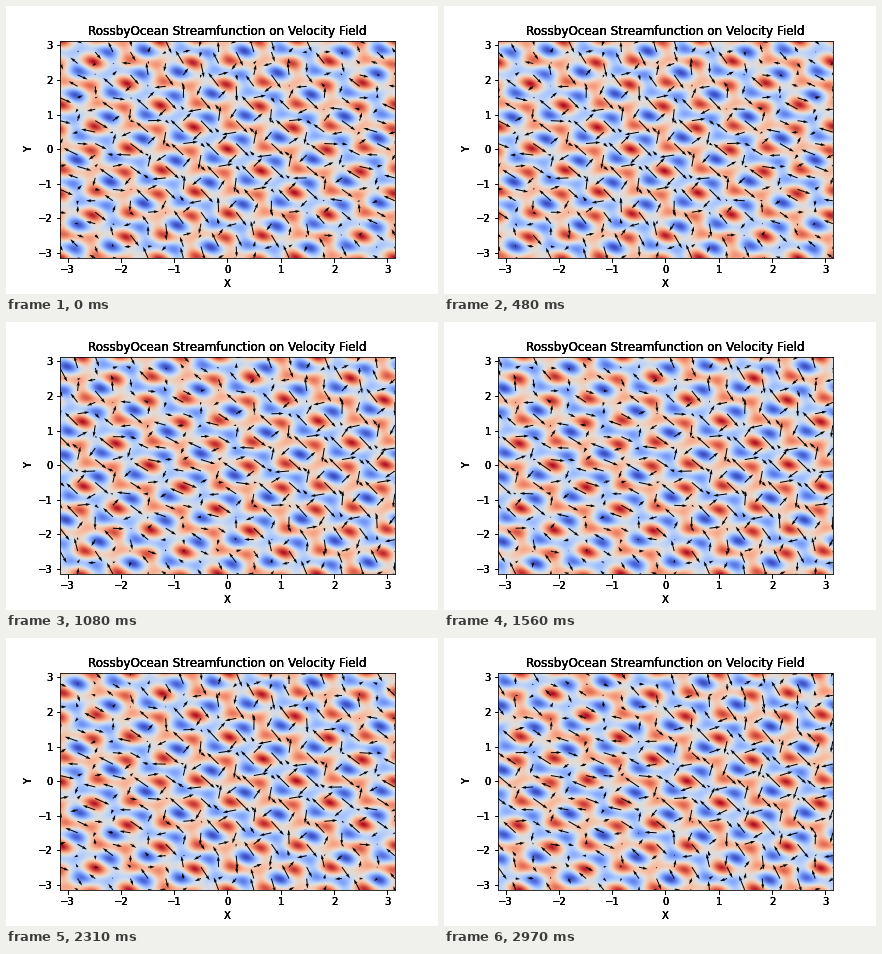
Animation, 432 px wide and 288 px high, one loop 3 s. Source, as a matplotlib script:

```python
import numpy as np
import matplotlib.pyplot as plt
from matplotlib.animation import FuncAnimation

plt.rcParams.update({"font.family": "DejaVu Sans", "font.size": 10})

FRAMES, INTERVAL = 100, 30
BETA, DT = 4.0, 100 / 99
MODES = [(10, 0), (0, 10), (7, 7)]
BOX = [0.125, 0.125, 0.775, 0.755]
L = np.pi


def phases(x, y, t):
    """Phase of each Rossby wave, with omega = -beta k / (k^2 + l^2)."""
    for k, l in MODES:
        omega = -BETA * k / (k * k + l * l)
        yield k, l, k * x + l * y - omega * t


def streamfunction(x, y, t):
    return sum(np.cos(p) for _, _, p in phases(x, y, t))


def velocity(x, y, t):
    waves = list(phases(x, y, t))
    u = sum(l * np.sin(p) for _, l, p in waves)
    v = sum(-k * np.sin(p) for k, _, p in waves)
    return u, v


def add_labels(ax):
    ax.set(xlim=(-L, L), ylim=(-L, L), xlabel="X", ylabel="Y",
           xticks=range(-3, 4), yticks=range(-3, 4))
    ax.set_title("RossbyOcean Streamfunction on Velocity Field", fontsize=12)


fig = plt.figure(figsize=(6, 4), dpi=72, facecolor="white")
ax = fig.add_axes(BOX)

# Pixel centres for the image, a coarser grid for the arrows
n = 200
mid = (np.arange(n) + 0.5) / n * 2 * L - L
X, Y = np.meshgrid(mid, mid)
side = np.linspace(-L, L, 20)
QX, QY = np.meshgrid(side, side)

image = ax.imshow(streamfunction(X, Y, 0), cmap="coolwarm", vmin=-3, vmax=3,
                  origin="lower", extent=(-L, L, -L, L), aspect="auto",
                  interpolation="bilinear")
arrows = ax.quiver(QX, QY, *velocity(QX, QY, 0))
add_labels(ax)

# Stacked copies of the frame give the lettering its heavy edge
for i in range(3):
    cover = fig.add_axes(BOX, frameon=False, label=f"cover{i}")
    add_labels(cover)


def update(i):
    t = i * DT
    image.set_data(streamfunction(X, Y, t))
    arrows.set_UVC(*velocity(QX, QY, t))
    return image, arrows


anim = FuncAnimation(fig, update, frames=FRAMES, interval=INTERVAL,
                     repeat=True, repeat_delay=0, blit=False)
plt.show()
```
